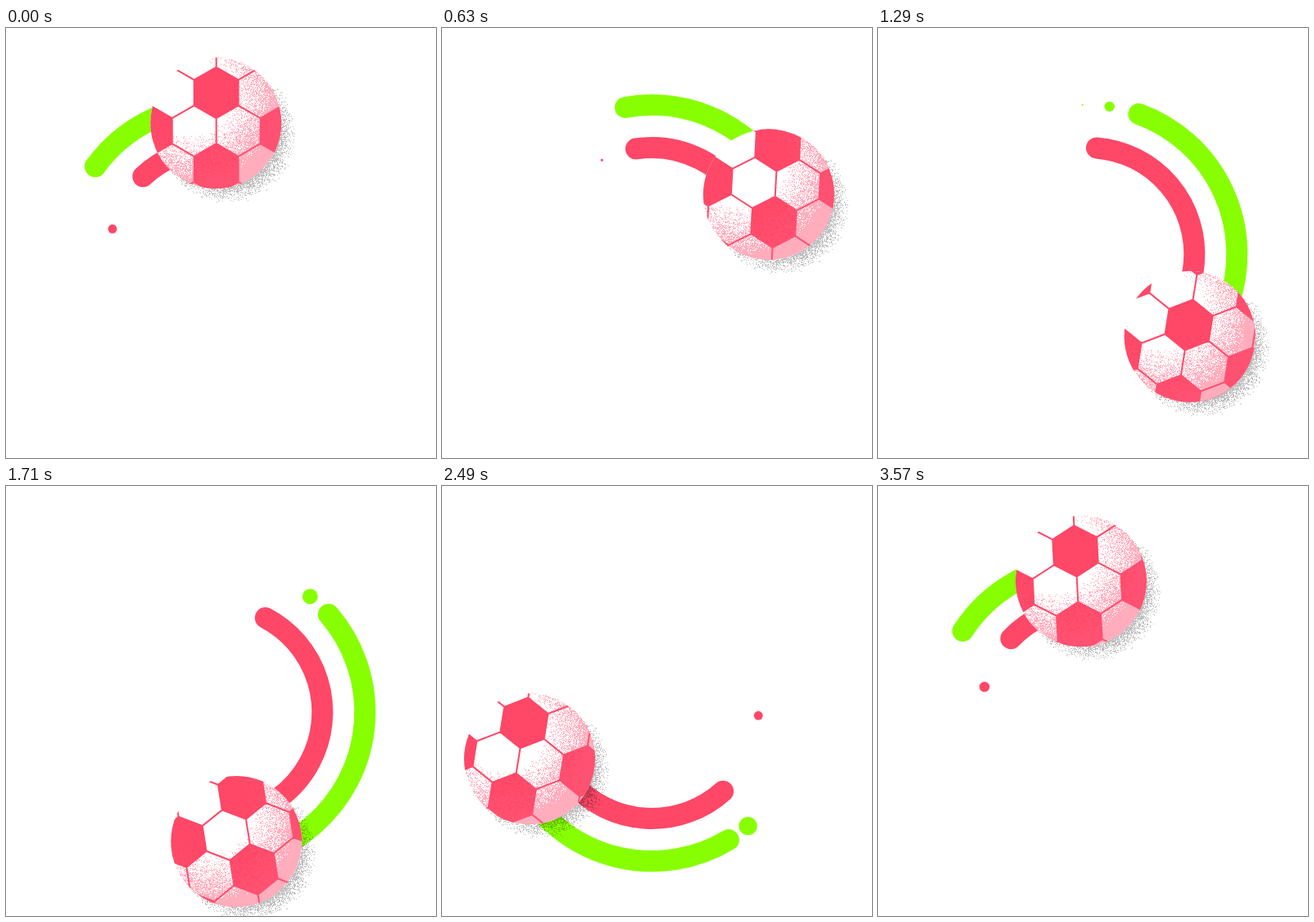
These frames come from a looping animation (525x525 px, 3.6 s). An HTML page with a canvas:

```html
<!DOCTYPE html>
<html lang="en">
<head>
<meta charset="utf-8">
<title>Rolling ball</title>
<style>
  html, body { margin: 0; width: 100%; height: 100%; overflow: hidden; background: #fff; }
  canvas { display: block; width: 525px; height: 525px; }
</style>
</head>
<body>
<canvas id="stage" width="525" height="525"></canvas>
<script>
const ctx = document.getElementById('stage').getContext('2d');
const LOOP = 3600, STEP = 30, STEPS = LOOP / STEP;
const TAU = Math.PI * 2, DEG = Math.PI / 180;
const CX = 256.3, CY = 276, ORBIT = 160, BALL = 80;
const RED = '#ff4767', GREEN = '#87ff00';
const HEX_W = 53.9, HEX_R = HEX_W / Math.sqrt(3);
const TRAIL_W = 26, DROP_LIFE = 19;

// Lengths are in degrees; drops lists the steps at which the tail sheds a dot.
const trails = [
  { color: GREEN, radius: 182, short: 54, grow: 68.4, drops: [0, 22, 27, 35, 53, 81, 84, 100] },
  { color: RED, radius: 130, short: 43.2, grow: 100.8, drops: [6, 61, 74, 91, 111] }
];

const clamp = v => Math.max(0, Math.min(1, v));
const smooth = u => u * u * (3 - 2 * u);

// Point on a circle around the stage pivot, clockwise from the top.
function polar(radius, deg) {
  return [CX + radius * Math.sin(deg * DEG), CY - radius * Math.cos(deg * DEG)];
}

function disc(x, y, r) {
  ctx.beginPath();
  ctx.arc(x, y, r, 0, TAU);
}

function seededRandom(seed) {
  return () => {
    seed = (Math.imul(seed, 1664525) + 1013904223) >>> 0;
    return seed / 4294967296;
  };
}

// Sprite of single-pixel specks, centred on the ball.
function makeGrain(fill, seed, density) {
  const half = 112, sprite = document.createElement('canvas');
  sprite.width = sprite.height = half * 2;
  const c = sprite.getContext('2d'), random = seededRandom(seed);
  c.fillStyle = fill;
  for (let y = -half; y < half; y++) {
    for (let x = -half; x < half; x++) {
      if (random() < density(x + 0.5, y + 0.5)) c.fillRect(x + half, y + half, 1, 1);
    }
  }
  return (x, y) => ctx.drawImage(sprite, Math.round(x) - half, Math.round(y) - half);
}

const drawShadow = makeGrain('rgba(0,0,0,0.25)', 17, (x, y) =>
  clamp((86 - Math.hypot(x - 13, y - 13)) / 24) ** 1.4);
const drawShade = makeGrain('rgba(255,92,124,0.5)', 91, (x, y) =>
  Math.hypot(x, y) > BALL ? 0 : clamp((Math.hypot(x + 32, y + 32) - 46) / 62) ** 1.2);

function tailAngle(trail, step) {
  const u = 1 - Math.abs(1 - step / (STEPS / 2));
  return step * 360 / STEPS - trail.short - trail.grow * smooth(u);
}

function drawTrail(trail, step) {
  ctx.fillStyle = ctx.strokeStyle = trail.color;
  for (const born of trail.drops) {
    const age = (step - born + STEPS) % STEPS;
    if (age >= DROP_LIFE) continue;
    const [x, y] = polar(trail.radius, tailAngle(trail, born));
    disc(x, y, TRAIL_W / 2 * (1 - age / DROP_LIFE) ** 1.35);
    ctx.fill();
  }
  const head = step * 360 / STEPS;
  ctx.lineWidth = TRAIL_W;
  ctx.lineCap = 'round';
  ctx.beginPath();
  ctx.arc(CX, CY, trail.radius, (tailAngle(trail, step) - 90) * DEG, (head - 90) * DEG);
  ctx.stroke();
}

function addHex(path, x, y) {
  for (let k = 0; k < 6; k++) {
    const a = (k * 60 + 30) * DEG;
    path[k ? 'lineTo' : 'moveTo'](x + HEX_R * Math.cos(a), y + HEX_R * Math.sin(a));
  }
  path.closePath();
}

// Every third hexagon of the honeycomb is filled.
const seams = new Path2D(), patches = new Path2D();
for (let row = -2; row <= 4; row++) {
  for (let col = -8; col <= 5; col++) {
    const x = (col + row / 2) * HEX_W, y = row * HEX_R * 1.5;
    addHex(seams, x, y);
    if ((col - row) % 3 === 0) addHex(patches, x, y);
  }
}

function drawBall(step) {
  const angle = step * 360 / STEPS;
  const [x, y] = polar(ORBIT, angle);
  drawShadow(x, y);
  ctx.save();
  disc(x, y, BALL);
  ctx.clip();
  ctx.fillStyle = '#fff';
  ctx.fillRect(x - BALL - 1, y - BALL - 1, BALL * 2 + 2, BALL * 2 + 2);

  // The pattern turns with the orbit and slides four repeats per loop.
  const repeat = HEX_W * 3;
  ctx.translate(x, y);
  ctx.rotate(angle * DEG);
  ctx.translate(0.4 + repeat * 4 * step / STEPS % repeat, -37);
  ctx.fillStyle = ctx.strokeStyle = RED;
  ctx.lineWidth = 2;
  ctx.fill(patches);
  ctx.stroke(seams);
  ctx.restore();
  drawShade(x, y);
}

function draw(now) {
  const step = Math.floor(now % LOOP / STEP);
  ctx.fillStyle = '#fff';
  ctx.fillRect(0, 0, 525, 525);
  for (const trail of trails) drawTrail(trail, step);
  drawBall(step);
}

let start;
function tick(now) {
  if (start === undefined) start = now;
  draw(Math.max(0, now - start));
  requestAnimationFrame(tick);
}
draw(0);
requestAnimationFrame(tick);
</script>
</body>
</html>
```
